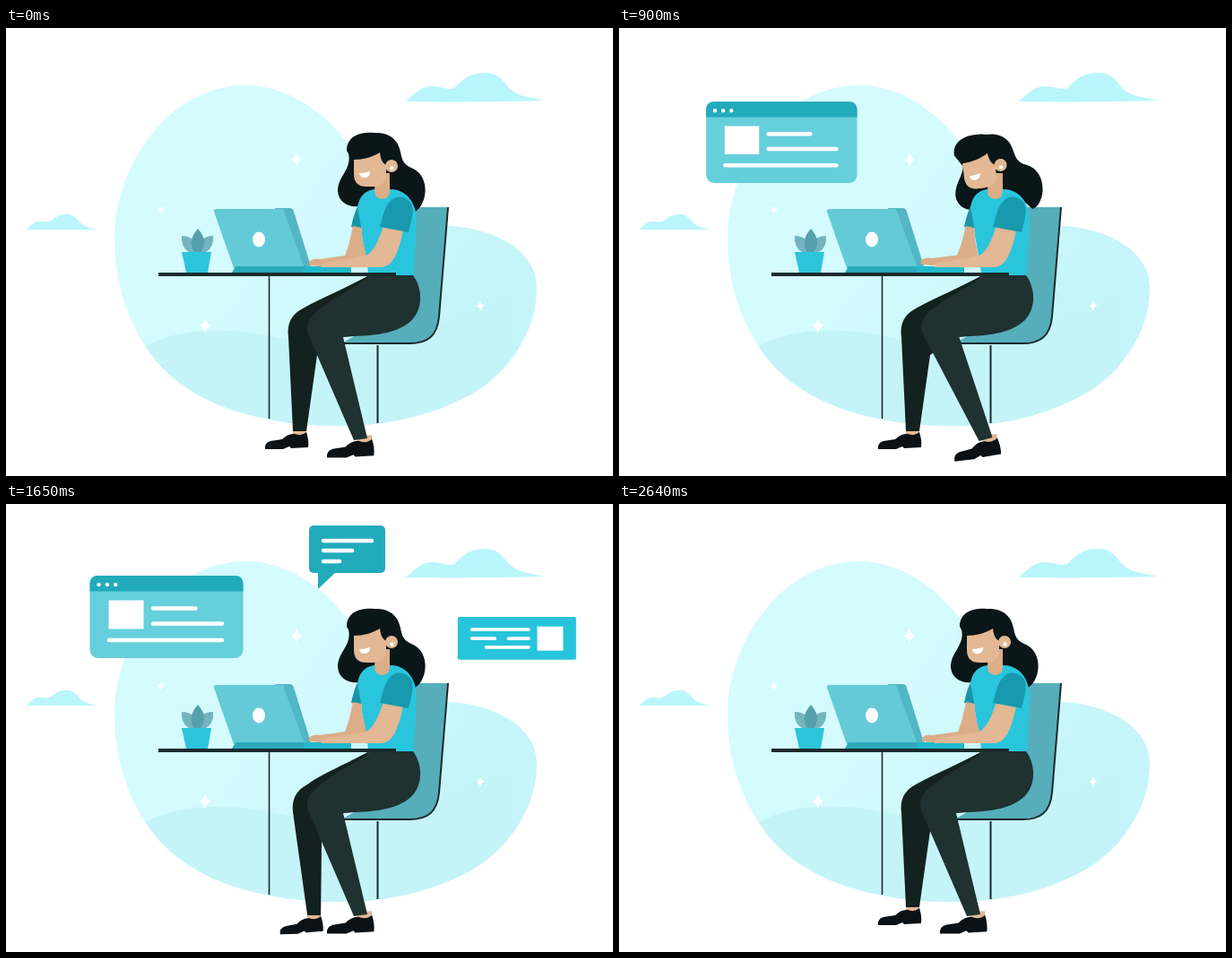
Animation, 677 px wide and 500 px high, one loop 2.7 s. Source, as an HTML page:

```html
<!DOCTYPE html>
<html lang="en">
<head>
<meta charset="utf-8">
<title>Working at a laptop</title>
<style>
  html, body { margin: 0; width: 100%; height: 100%; overflow: hidden; background: #fff; }
  svg { display: block; width: 100%; height: 100%; }
  .lines { fill: none; stroke: #fff; stroke-width: 4.5; stroke-linecap: round; }
  .white { fill: #fff; }
  .edge { fill: none; stroke: #1b2a2c; }
  .skin { fill: #e3b894; }
  .shade { fill: #dbad88; }
  .hair { fill: #0a1618; }
  .teal { fill: #22abbb; }
</style>
</head>
<body>
<svg viewBox="0 0 677 500">
  <defs>
    <linearGradient id="sky" gradientUnits="userSpaceOnUse" x1="340" y1="180" x2="500" y2="290">
      <stop stop-color="#d4fbff"/><stop offset="1" stop-color="#c6f5f9"/>
    </linearGradient>
    <path id="blob" d="M268 64C312 64 354 92 382 130C415 175 440 218 495 221C548 224 592 250 592 290C592 340 560 385 520 408C470 436 420 444 370 444C300 444 224 428 177 382C140 344 121 290 121 235C121 156 180 64 268 64Z"/>
    <clipPath id="inside"><use href="#blob"/></clipPath>
    <path id="star" d="M0-9Q1.5-1.5 6.5 0Q1.5 1.5 0 9Q-1.5 1.5-6.5 0Q-1.5-1.5 0-9Z"/>
    <g id="shoe">
      <path class="skin" d="M320 447H335V458H320Z"/>
      <path fill="#0b1114" d="M289 470Q288 463 295 461L308 459Q315 452 322 453Q330 456 335 451Q338 460 337 468L318 469L316 467L309 470Z"/>
    </g>
  </defs>

  <use href="#blob" fill="url(#sky)"/>
  <path clip-path="url(#inside)" fill="#c5f4f8" d="M140 365C180 334 245 331 310 347C350 356 400 364 430 352L560 300V460H140Z"/>
  <g fill="#b9f6fb">
    <path d="M446 82C455 74 462 66 473 65C485 64 492 70 500 67C508 60 515 49 537 50C553 51 556 64 566 71C575 77 590 78 600 81C560 82 500 83 446 82Z"/>
    <path d="M23 225C28 219 33 215 40 216C46 217 48 216 52 214C57 209 64 207 71 208C78 210 82 217 86 220C92 223 98 224 101 225Z"/>
  </g>
  <g class="white">
    <use href="#star" x="324" y="147"/>
    <use href="#star" x="222" y="332"/>
    <use href="#star" transform="translate(173 203) scale(.65)"/>
    <use href="#star" transform="translate(529 310) scale(.7)"/>
  </g>

  <g id="page">
    <rect x="93.5" y="80" width="171" height="92" rx="9" fill="#66cfdc"/>
    <path class="teal" d="M93.5 97.5V89Q93.5 80 102.5 80H255.5Q264.5 80 264.5 89V97.5Z"/>
    <path class="white" d="M114.5 107.5H153.5V139.5H114.5Z"/>
    <path class="lines" d="M103.5 90h.01m9.3 0h.01m9.3 0h.01M164 116.5H211.5M164 133.5H241M115 152H241"/>
  </g>
  <g id="bubble">
    <path class="teal" d="M348 74V95L370 74Z"/>
    <rect class="teal" x="338" y="24" width="85" height="53" rx="5"/>
    <path class="lines" d="M354 41H408M354 52H386M354 64H372"/>
  </g>
  <g id="card">
    <rect x="510" y="122" width="137" height="49.5" rx="2" fill="#27c4db"/>
    <path class="white" d="M602 133H632V161H602Z"/>
    <path class="lines" style="stroke-width:4" d="M526.5 136.500H592M526.5 147H553M569 147H592M543 157H592"/>
  </g>

  <path fill="#56aebb" d="M440 200H493L483 322C481 343 470 351 450 351H376L430 320Z"/>
  <path class="edge" stroke-width="2" d="M493 200L483 322C481 344 470 352 450 352H376M414.5 354V441"/>
  <path class="edge" stroke-width="1.6" d="M293.5 277V436"/>

  <g id="farShoe"><use href="#shoe"/></g>
  <path id="farLeg" fill="#13211f"/>
  <g id="nearShoe"><use href="#shoe" transform="translate(358 479.500) scale(1.09) translate(-289 -470)"/></g>
  <path id="nearLeg" fill="#1f3130"/>

  <path id="backHair" class="hair" d="M382 140C386 158 370 165 370 182C371 196 385 202 398 198C410 194 420 185 430 187C443 191 447 200 454 206C470 200 475 165 452 156C438 150 443 140 436 128C429 118 420 117 410 117C395 117 382 125 382 140Z"/>
  <path fill="#1a93a8" d="M397 192C390 200 387 212 385 222L400 225Z"/>
  <path fill="#29c5dd" d="M410 180H430C449 181 458 198 458 215L455 276H404C403 255 397 240 396 222L392 200C394 188 400 182 410 180Z"/>
  <path class="shade" d="M412 162H428V183Q427 191 419 191Q411 190 411 182Z"/>
  <g id="head">
    <path class="hair" d="M380 137C380 120 396 116 410 117C428 117 437 134 436 150L426 160L388 150Z"/>
    <path class="skin" d="M388 147C398 147 409 144 417 139C418 146 419 150 424 153V168Q420 177 409 177H402Q388 177 388 163Z"/>
    <circle class="skin" cx="430" cy="154" r="7"/>
    <circle class="white" cx="430.5" cy="156.500" r="2.300"/>
    <path class="white" d="M394 162Q400 162 406 160C407 168 395 170 394 162Z"/>
  </g>

  <path fill="#74b4be" d="M196 232Q213 232 213 250H204Q195 245 196 232ZM231 232Q214 232 214 250H223Q232 245 231 232Z"/>
  <path fill="#56a0ac" d="M214 224C223 234 223 243 217 250H210C205 243 205 234 214 224Z"/>
  <path fill="#2cc5db" d="M196 250H229L225 273H201Z"/>

  <path fill="#52b6c5" d="M300 201H316Q320 201 321 205L341 269H320Z"/>
  <path fill="#64cad8" d="M235 202H309L333 268H254L232 205Q231 202 235 202Z"/>
  <path fill="#2ba9b9" d="M256 266H333V273H252Z"/>
  <path fill="#22b9cc" d="M332 266H385V273H332Z"/>
  <ellipse class="white" cx="282" cy="236" rx="7" ry="8.5"/>

  <path id="farArm" class="shade" d="M387 221L397 223C396 238 402 250 402 256L350 266L338 265C337 259 342 257 350 258L378 254C382 245 384 235 387 221Z"/>
  <g id="nearArm">
    <path class="skin" d="M421 221L443 225C440 242 435 256 429 262C424 268 416 267 408 267H352C352 262 358 261 366 260L402 254C410 250 416 236 421 221Z"/>
    <path fill="#1899ae" d="M428 194C434 186 446 187 452 196C456 204 452 215 449 228L417 222C420 212 422 200 428 194Z"/>
  </g>
  <path class="edge" stroke-width="4" d="M170 275H435"/>
</svg>
<script>
  const LOOP = 2700;
  const part = id => document.getElementById(id);
  const clamp = x => Math.max(0, Math.min(1, x));
  const ramp = (t, from, to) => {
    const u = clamp((t - from) / (to - from));
    return u * u * (3 - 2 * u);
  };
  const place = (id, transform) => part(id).setAttribute('transform', transform);

  // Panels fly out of the screen and are drawn back in at the end.
  function pop(id, t, start) {
    const grow = t < start ? 0 : 1 - 2 ** ((start - t) / 60);
    const shrink = t < 2630 ? 1 - 2 ** ((t - 2630) / 33) : 0;
    place(id, `translate(336 236) scale(${grow * shrink}) translate(-336 -236)`);
  }

  // Each lower leg swings back from the knee, then returns.
  function legs(t) {
    const near = ramp(t, 560, 940) - ramp(t, 1080, 1400);
    const nx = 14 * near;
    place('nearShoe', `translate(${nx} 0) rotate(${-7 * near} 396 458)`);
    part('nearLeg').setAttribute('d', `M406 276H454C466 292 466 320 445 332C425 344 400 343 ${376 + nx / 4} 345L${403 + nx} ${458 - near}L${388 + nx} ${460 + near}L${337 + nx / 6} 342C332 328 345 317 356 309C372 297 395 287 406 276Z`);

    const far = ramp(t, 1430, 1800) - ramp(t, 2000, 2370);
    const fx = 25 * far, fy = 14 * far, knee = 8 * far;
    place('farShoe', `translate(${fx} ${fy}) rotate(${-3 * far} 328 452)`);
    part('farLeg').setAttribute('d', `M405 276C382 289 352 301 ${331 + knee} 313C${318 + knee} 320 ${313 + knee} 330 ${315 + knee} 345L${320 + fx} ${450 + fy}H${335 + fx}L${347 + knee} 365L380 340Z`);
  }

  // The hands take turns on the keyboard.
  function type(t) {
    const beat = t < 2640 ? Math.sin(2 * Math.PI * t / 660) : 0;
    const near = Math.max(0, -beat), far = Math.max(0, beat);
    place('nearArm', `rotate(${5.3 * near} 440 195)`);
    place('farArm', `rotate(${2 * far} 392 215)`);
  }

  function draw(now) {
    const t = now % LOOP;
    pop('page', t, 538);
    pop('bubble', t, 941);
    pop('card', t, 1363);
    legs(t);
    type(t);
    const nod = -9 * Math.sin(Math.PI * clamp((t - 560) / 1000)) ** 2;
    place('head', `rotate(${nod} 420 190)`);
    place('backHair', `rotate(${nod} 425 140)`);
    requestAnimationFrame(draw);
  }
  requestAnimationFrame(draw);
</script>
</body>
</html>
```
